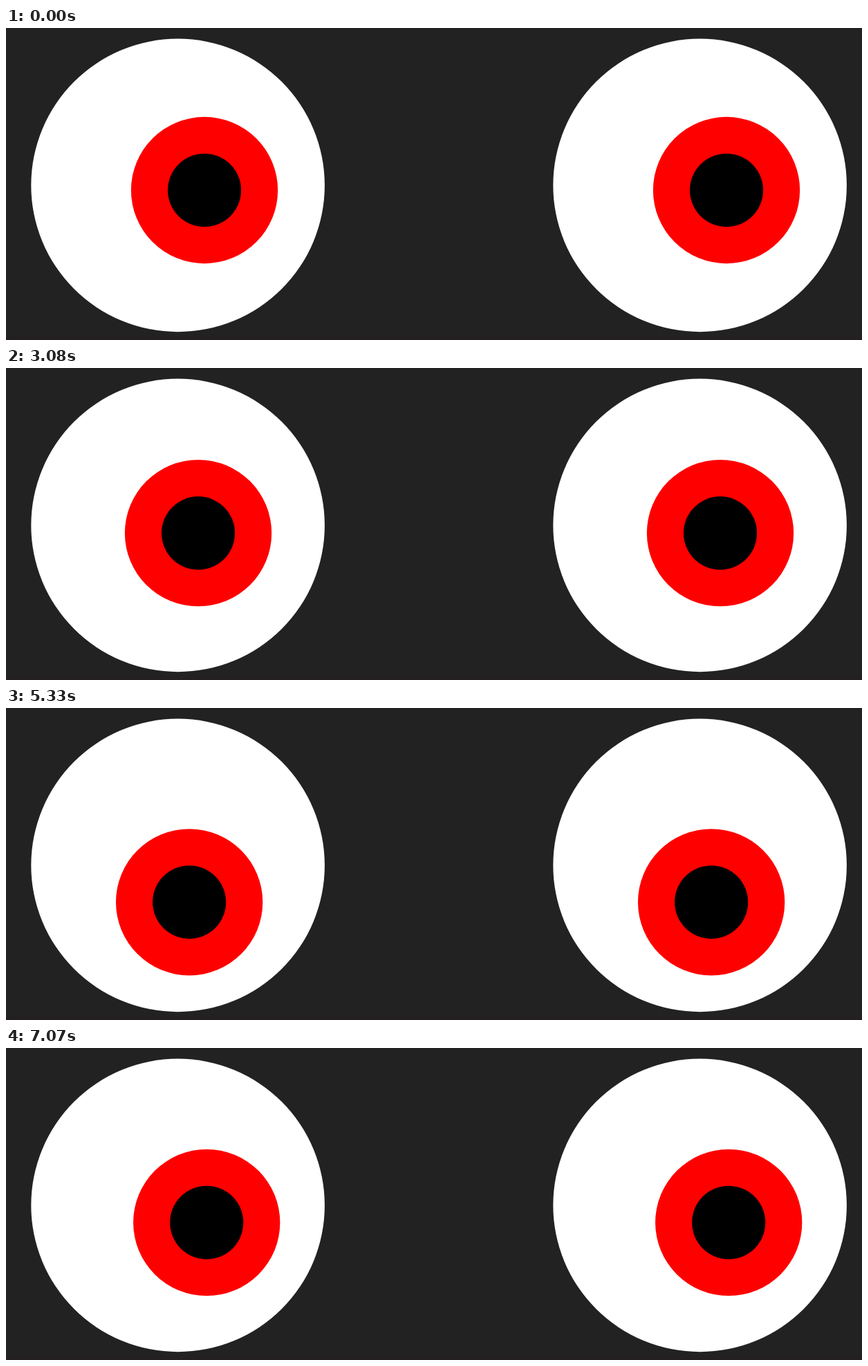
An HTML page with a canvas for the animation above (7.21 s loop, 1238x452 px).

```html
<!DOCTYPE html>
<html>
<head>
<meta charset="utf-8">
<title>Eyes</title>
<style>
  html, body { margin: 0; width: 100%; height: 100%; overflow: hidden; background: #222; }
  canvas { display: block; }
</style>
</head>
<body>
<canvas id="stage" width="1238" height="452"></canvas>
<script>
const ctx = document.getElementById('stage').getContext('2d');
const LOOP = 7210, STEP = 110;
const EYE_X = 248.6, EYE_Y = 227.9, EYE_GAP = 755, EYE_R = 212.3;

// Spots the left iris looks at, as centre points.
const spot = (x, y) => ({ x, y });
const start = spot(287, 235), end = spot(290.2, 252.9);
const ahead = spot(275.2, 237.4), middle = spot(268.7, 227.6);
const left = spot(233.2, 239), lowLeft = spot(160.3, 262.9), upLeft = spot(204.5, 196);
const right = spot(308.3, 243), lowRight = spot(317, 264), upRight = spot(284, 228);
const low = spot(265.1, 281.3), below = spot(270.5, 268.8);

// When each spot is reached; the same spot twice is a pause.
const glances = [
  [0, start], [430, lowLeft], [1030, lowLeft], [1270, ahead], [1500, lowLeft],
  [1760, spot(297, 239.7)], [2140, right], [2470, lowRight], [3150, ahead], [4020, left],
  [4900, lowRight], [5240, lowRight], [5330, low], [5420, lowRight], [5570, below],
  [6120, middle], [6200, upLeft], [6360, upRight], [6510, upLeft], [6760, upRight], [7070, end]
];

const ease = p => (1 - Math.cos(Math.PI * p)) / 2;
const mix = (a, b, p) => a + (b - a) * p;

// Eases between spots in even held steps of about STEP ms.
function gazeAt(ms) {
  const next = glances.findIndex(([time]) => time > ms);
  if (next < 0) return end;
  const [t0, from] = glances[next - 1];
  const [t1, to] = glances[next];
  const steps = Math.max(1, Math.round((t1 - t0) / STEP));
  const p = ease(Math.floor((ms - t0) / (t1 - t0) * steps) / steps);
  return spot(mix(from.x, to.x, p), mix(from.y, to.y, p));
}

function disc(x, y, r, color) {
  ctx.fillStyle = color;
  ctx.beginPath();
  ctx.arc(x, y, r, 0, Math.PI * 2);
  ctx.fill();
}

function draw(ms) {
  ctx.fillStyle = '#222';
  ctx.fillRect(0, 0, 1238, 452);
  ctx.fillStyle = '#251f22';
  ctx.fillRect(0, 448, 1238, 4);
  const { x, y } = gazeAt(ms);
  for (const dx of [0, EYE_GAP]) {
    disc(EYE_X + dx, EYE_Y, EYE_R, '#fff');
    disc(x + dx, y, EYE_R / 2, '#f00');
    disc(x + dx, y, EYE_R / 4, '#000');
  }
}

const began = performance.now();
function tick() {
  draw((performance.now() - began) % LOOP);
  requestAnimationFrame(tick);
}
tick();
</script>
</body>
</html>
```
